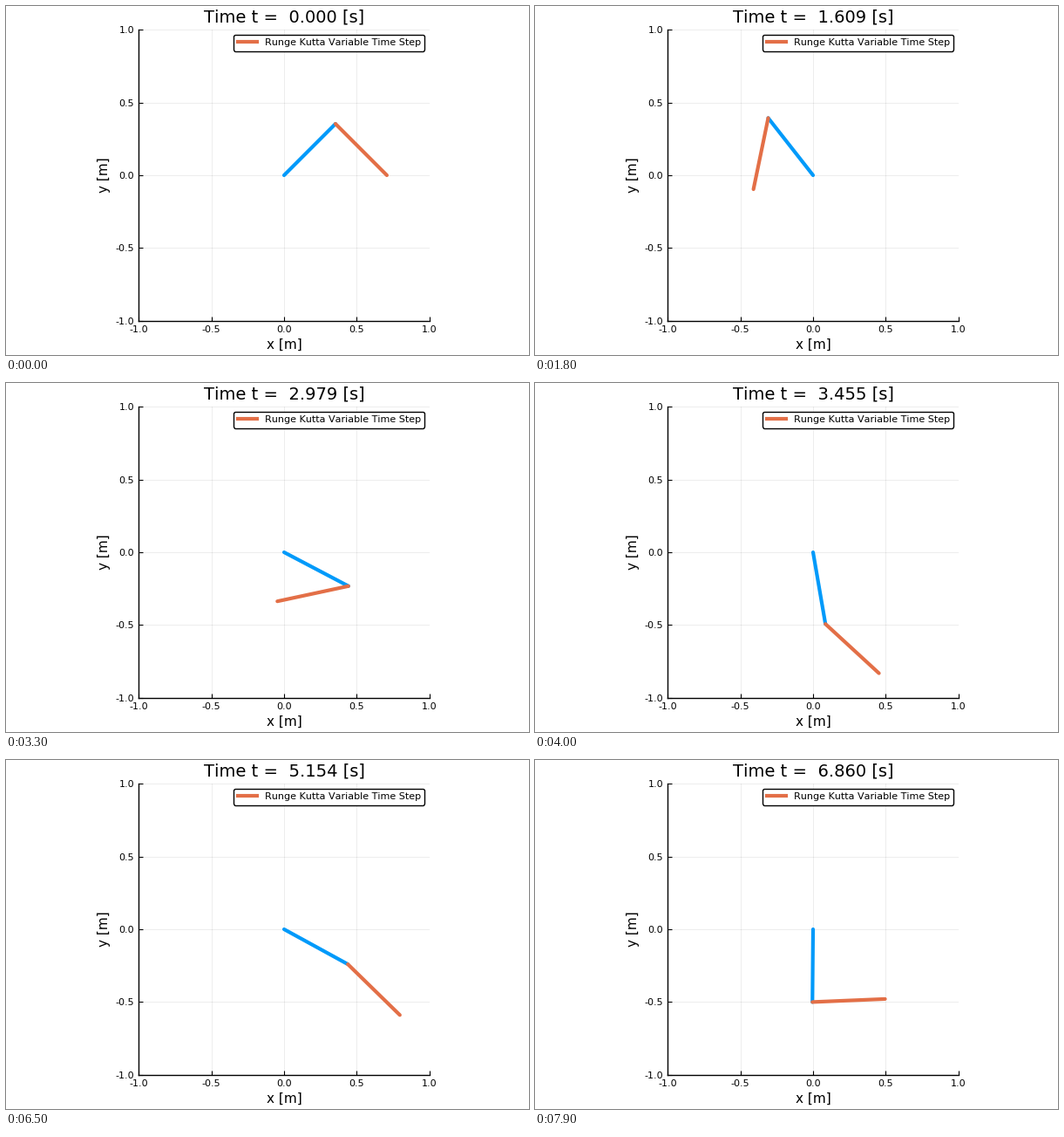
These frames come from a looping animation (600x400 px, 8000 ms). A matplotlib script:

```python
import matplotlib.pyplot as plt
import numpy as np
from matplotlib.animation import FuncAnimation

W, H, DPI = 600, 400, 100
STEPS, INTERVAL = 80, 100
ROD = 0.5
BLUE = (0.0, 0.6056, 0.9787)
ORANGE = (0.8889, 0.4356, 0.2781)

# Simulated time at a few solver steps; the step size varies between them.
CLOCK_STEPS = [0, 9, 18, 26, 40, 54, 65, 79]
CLOCK = [0, 0.56, 1.609, 2.503, 3.455, 4.322, 5.154, 6.860]

# Key poses: solver step, then both rod angles in degrees from straight down.
POSES = [
    (0, 135, 45), (9, 29, 12), (14, -88, 21), (18, -141.9, -11.7),
    (26, -58.4, -93.1), (30, 28, -104), (34, 66.5, -65), (40, 9.8, 47.4),
    (45, -22, 125), (50, -12, 206), (54, -46.9, 305), (58, -28, 316),
    (62, 42, 338), (65, 61.3, 405.7), (71, 112, 387), (75, 79, 445),
    (79, -0.5, 452.4),
]


def swing(x, xk, yk):
    """Cubic curve through the knots that starts at rest."""
    slope = np.gradient(yk, xk)
    slope[0] = 0
    i = np.clip(np.searchsorted(xk, x, side="right") - 1, 0, len(xk) - 2)
    h = xk[i + 1] - xk[i]
    u = (x - xk[i]) / h
    return ((1 + 2 * u) * (1 - u) ** 2 * yk[i]
            + u * (1 - u) ** 2 * h * slope[i]
            + u ** 2 * (3 - 2 * u) * yk[i + 1]
            + u ** 2 * (u - 1) * h * slope[i + 1])


def rod_end(theta):
    return ROD * np.array([np.sin(theta), -np.cos(theta)])


steps = np.arange(STEPS)
times = np.interp(steps, CLOCK_STEPS, CLOCK)
knots, *angles = np.array(POSES).T
theta1, theta2 = (np.radians(swing(steps, knots, a)) for a in angles)
elbow = rod_end(theta1)
tip = elbow + rod_end(theta2)

plt.rcParams.update({"font.family": "DejaVu Sans", "text.kerning_factor": 6})
fig = plt.figure(figsize=(W / DPI, H / DPI), dpi=DPI, facecolor="white")
ax = fig.add_axes([152.2 / W, 39.2 / H, 333.6 / W, 333.6 / H])
ax.set(xlim=(-1, 1), ylim=(-1, 1))

ticks = np.linspace(-1, 1, 5)
labels = [f"{v:.1f}" for v in ticks]
ax.set_xticks(ticks, labels)
ax.set_yticks(ticks, labels)
ax.tick_params(direction="in", labelsize=8)
ax.set_xlabel("x [m]", fontsize=11)
ax.set_ylabel("y [m]", fontsize=11)
ax.grid(color="black", alpha=0.1, linewidth=0.5)
ax.set_axisbelow(True)
ax.spines[["top", "right"]].set_visible(False)
ax.spines[["left", "bottom"]].set_linewidth(1)

rod_style = dict(linewidth=3, solid_capstyle="round")
inner, = ax.plot([], [], color=BLUE, **rod_style)
outer, = ax.plot([], [], color=ORANGE, label="Runge Kutta Variable Time Step",
                 **rod_style)
legend = ax.legend(loc="upper right", fontsize=8, framealpha=1,
                   edgecolor="black", facecolor="white")
legend.get_lines()[0].set_solid_capstyle("projecting")
title = ax.set_title("", fontsize=14)


def draw(n):
    inner.set_data([0, elbow[0, n]], [0, elbow[1, n]])
    outer.set_data([elbow[0, n], tip[0, n]], [elbow[1, n], tip[1, n]])
    title.set_text(f"Time t =  {times[n]:.3f} [s]")
    return inner, outer, title


anim = FuncAnimation(fig, draw, frames=STEPS, interval=INTERVAL,
                     repeat=True, repeat_delay=0, blit=False)
plt.show()
```
